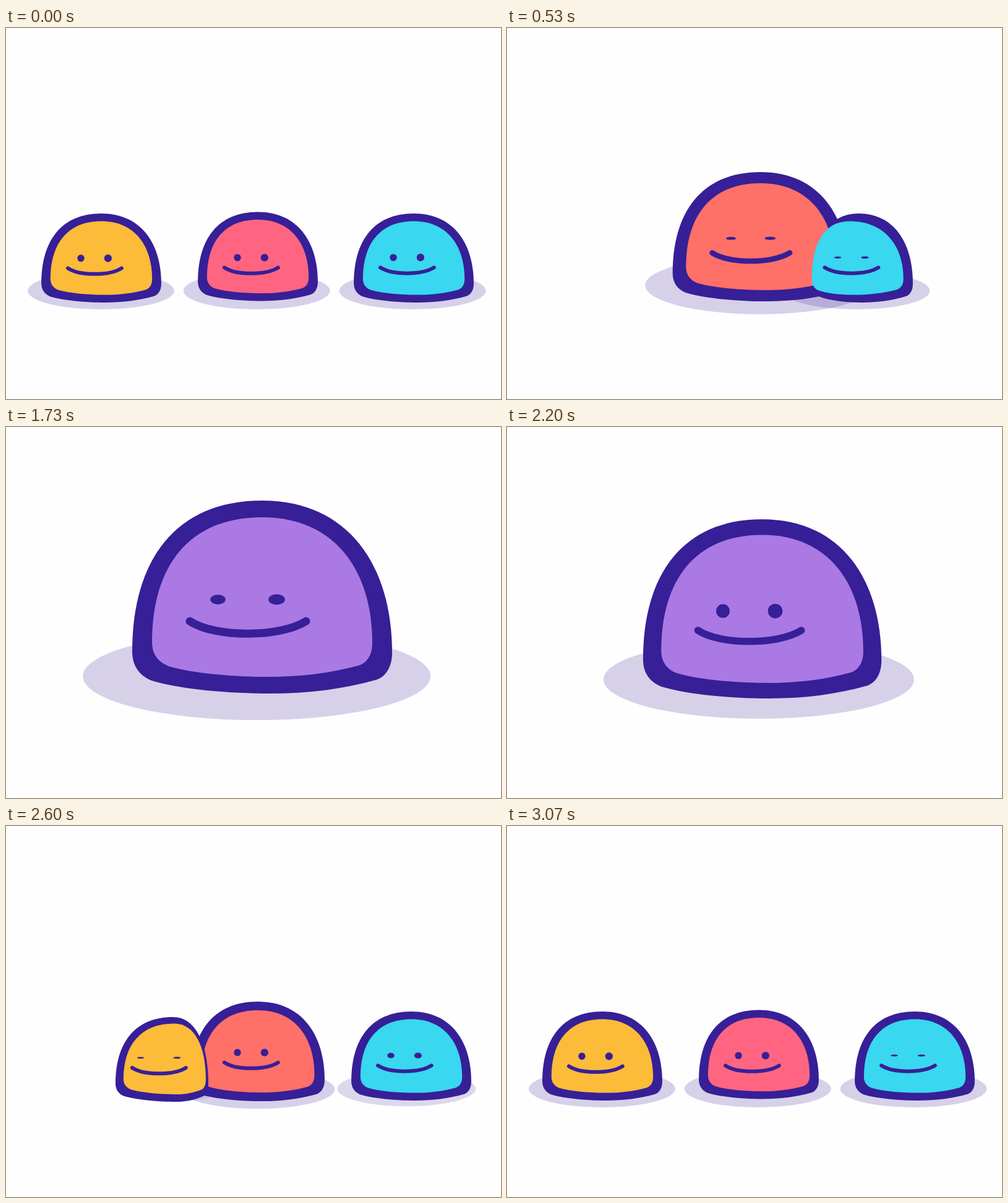
An HTML page with a canvas that plays this animation: 800 by 600 pixels, repeating every 3470 ms.

```html
<!DOCTYPE html>
<html lang="en">
<head>
<meta charset="utf-8">
<title>Merging blobs</title>
<style>
  html, body { margin: 0; width: 100%; height: 100%; overflow: hidden; background: #fefefe; }
  canvas { display: block; width: 800px; height: 600px; }
</style>
</head>
<body>
<canvas width="800" height="600"></canvas>
<script>
const ctx = document.querySelector('canvas').getContext('2d');
const LOOP = 3470, FPS = 15, SMALL = 0.4615;
const INK = '#371f97', PINK = '#ff6580', CORAL = '#ff7068', PURPLE = '#aa79e3';

// Outline around the body's centre: a start point, then six cubic curves.
const BODY = [-210,88, -210,-60,-140,-156,0,-156, 140,-156,210,-50,210,90,
  210,110,202,128,184,134, 130,149,75,156,13,156, -50,156,-130,150,-179,135, -198,127,-210,112,-210,88];
const scalePath = (path, sx, sy) => path.map((v, i) => v * (i % 2 ? sy : sx));
const inset = path => scalePath(path, 0.8476, 0.827);
const REST_OUTER = scalePath(BODY, SMALL, SMALL), REST_INNER = inset(REST_OUTER);

// step, scale x, scale y, centre y, face scale, shadow radius
const MAIN = [
  [0, SMALL, SMALL, 369.5, SMALL, 118.5],
  [4, .47, .468, 368.5, SMALL, 120],
  [6, .625, .61, 347, .64, 165],
  [8, .676, .67, 337.5, .667, 185],
  [9, .69, .675, 336, .667, 188],
  [10, .86, .84, 305, .85, 238],
  [11, 1, 1.1, 262, 1, 277],
  [12, 1, 1, 275, 1, 281],
  [32, 1, 1, 275, 1, 281],
  [35, .752, .785, 332.5, .667, 191],
  [38, .59, .58, 353, .56, 150],
  [39, .514, .516, 364.5, SMALL, 125],
  [40, .474, .472, 368.5, SMALL, 122],
  [41, SMALL, SMALL, 369.5, SMALL, 118.5]
];
const MAIN_BLINKS = [8.3, 27];
const SHADOW_GROWTH = [60, 82, 112, 119, 125, 128, 122];

// outer and inner: squashed shape as top x, left scale, right scale, y scale, y shift
const yellow = {
  x: 154, y: 372, dir: 1, fill: '#fdbb3a', shadowX: 153.5, faceY: -1.5,
  outer: [-4, .96, .588, .953, 5.5], inner: [-2, 1, .62, .962, 4.75],
  squashFace: [-16, 2.5], eyeSpread: 7.5, lift: 0, blinks: [4.2, 39.2],
  mergeAt: 1, merge: [5, 18, 55, 110],
  emergeAt: 38, emerge: [160, 120, 47, 16, 4], shadowAt: 38
};
const cyan = {
  x: 659, y: 372, dir: -1, fill: '#39d7f0', shadowX: 657, faceY: -2.7,
  outer: [9, .77, .907, 1, 0], inner: [-6, .737, 1.067, 1, 0],
  squashFace: [8.5, 0], eyeSpread: 0, lift: 2, blinks: [8.3, 34, 37.75, 46.27],
  mergeAt: 4, merge: [2, 6, 18, 48, 100, 145],
  emergeAt: 34, emerge: [125, 81, 40, 20, 9, 4, 1], shadowAt: 37
};

const clamp01 = v => Math.max(0, Math.min(1, v));
const mix = (a, b, k) => a.map((v, i) => v + (b[i] - v) * k);
const openness = (step, blinks) => Math.min(1, ...blinks.map(b => 0.15 + 0.48 * Math.abs(step - b)));

function squashPath(path, [top, left, right, sy, dy], amount) {
  const squashed = path.map((v, i) => i % 2 ? v * sy + dy : top + v * (v < 0 ? left : right));
  return mix(path, squashed, amount);
}

function mainPose(step) {
  const next = MAIN.findIndex(row => row[0] > step);
  if (next < 0) return MAIN[MAIN.length - 1];
  const a = MAIN[next - 1], b = MAIN[next];
  return mix(a, b, (step - a[0]) / (b[0] - a[0]));
}

function mainFill(step) {
  if (step < 5 || step >= 40) return PINK;
  return step >= 10 && step < 37 ? PURPLE : CORAL;
}

function ellipse(x, y, rx, ry, color) {
  ctx.fillStyle = color;
  ctx.beginPath();
  ctx.ellipse(x, y, rx, ry, 0, 0, Math.PI * 2);
  ctx.fill();
}

function shadow(x, y, r, alpha = 0.2) {
  ellipse(x, y, r, r * 0.2527, `rgba(55,31,151,${alpha})`);
}

function fillPath(path, x, y, color) {
  ctx.save();
  ctx.translate(x, y);
  ctx.beginPath();
  ctx.moveTo(path[0], path[1]);
  for (let i = 2; i < path.length; i += 6) ctx.bezierCurveTo(...path.slice(i, i + 6));
  ctx.fillStyle = color;
  ctx.fill();
  ctx.restore();
}

function face(x, y, scale, open, spread = 0) {
  ctx.save();
  ctx.translate(x, y);
  ctx.scale(scale, scale);
  ellipse(-71.5 - spread / scale, 4, 12.3, 12.5 * open, INK);
  ellipse(23.5 + spread / scale, 4, 13.3, 13.3 * open, INK);
  ctx.strokeStyle = INK;
  ctx.lineWidth = 13;
  ctx.lineCap = 'round';
  ctx.beginPath();
  ctx.moveTo(-117, 39);
  ctx.bezierCurveTo(-76, 66, 28, 66, 71, 39);
  ctx.stroke();
  ctx.restore();
}

function sideBlob(blob, step) {
  const emerging = step >= blob.emergeAt;
  const merged = !emerging && step >= blob.mergeAt + blob.merge.length;
  if (merged) return { shadow() {}, outline() {}, front() {} };

  const travel = (emerging ? blob.emerge[step - blob.emergeAt] : blob.merge[step - blob.mergeAt]) || 0;
  const squash = clamp01((travel - 30) / 50);
  const x = blob.x + blob.dir * travel;
  const y = blob.y - (emerging ? blob.lift * squash : 0);
  const [faceDx, faceDy] = blob.squashFace;
  return {
    shadow() {
      const age = emerging ? step - blob.shadowAt : Infinity;
      if (age < 0) return;
      const shift = travel * 0.92 + (emerging ? Math.min(travel * 1.5, 6) : 0);
      shadow(blob.shadowX + blob.dir * shift, 425, SHADOW_GROWTH[age] || 118.5, Math.min(0.2, 0.03 + 0.07 * age));
    },
    outline: () => fillPath(squashPath(REST_OUTER, blob.outer, squash), x, y, INK),
    front() {
      fillPath(squashPath(REST_INNER, blob.inner, squash), x, y, blob.fill);
      face(x + faceDx * squash, y + blob.faceY + faceDy * squash, SMALL,
        openness(step, blob.blinks), blob.eyeSpread * squash);
    }
  };
}

function draw(step) {
  const [, sx, sy, y, faceScale, radius] = mainPose(step);
  const x = 401 + 13 * faceScale;
  const left = sideBlob(yellow, step), right = sideBlob(cyan, step);
  const body = scalePath(BODY, sx, sy);
  ctx.fillStyle = '#fefefe';
  ctx.fillRect(0, 0, 800, 600);
  shadow(405.2 + 45 * (sx - SMALL) * (1 - sx), 425 - (radius - 118.5) * 0.135 + (sy - faceScale) * 30, radius);
  left.shadow();
  right.shadow();
  // The right blob's outline lies behind the main fill.
  right.outline();
  fillPath(body, x, y, INK);
  fillPath(inset(body), x, y, mainFill(step));
  face(x, y, faceScale, openness(step, MAIN_BLINKS));
  left.outline();
  left.front();
  right.front();
}

const start = performance.now();
function tick() {
  const time = (performance.now() - start) % LOOP;
  draw(Math.floor((time + 5) * FPS / 1000));
  requestAnimationFrame(tick);
}
tick();
</script>
</body>
</html>
```
